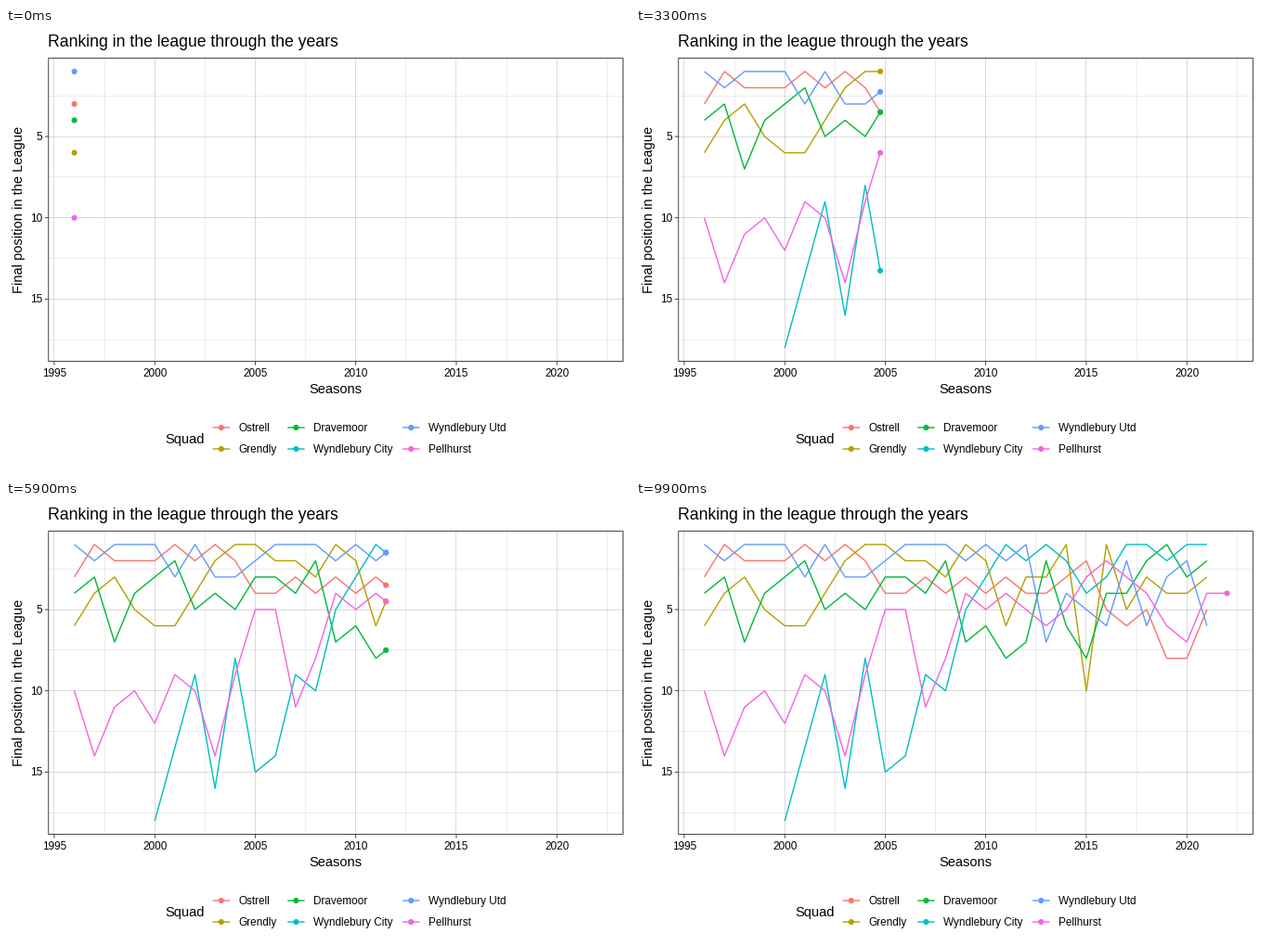
These frames come from a looping animation (672 by 480 pixels, 10000 ms). A matplotlib script:

```python
import math

import matplotlib.pyplot as plt
import numpy as np
from matplotlib.animation import FuncAnimation
from matplotlib.patches import Circle, Rectangle

W, H, DPI = 672, 480, 96
FRAMES, INTERVAL = 100, 100
PX = 72 / DPI                      # points per pixel
LEFT, RIGHT, TOP, BOTTOM = 45.45, 664.67, 32.0, 360.0
FIRST, LAST = 1996, 2022
LINE_W, DOT_R = 1.42, 3.08

# name, colour, first season, final positions
SQUADS = [
    ("Ostrell", "#F8766D", 1996,
     [3, 1, 2, 2, 2, 1, 2, 1, 2, 4, 4, 3, 4, 3, 4, 3, 4, 4, 3, 2, 5, 6, 5, 8, 8, 5]),
    ("Grendly", "#B79F00", 1996,
     [6, 4, 3, 5, 6, 6, 4, 2, 1, 1, 2, 2, 3, 1, 2, 6, 3, 3, 1, 10, 1, 5, 3, 4, 4, 3]),
    ("Dravemoor", "#00BA38", 1996,
     [4, 3, 7, 4, 3, 2, 5, 4, 5, 3, 3, 4, 2, 7, 6, 8, 7, 2, 6, 8, 4, 4, 2, 1, 3, 2]),
    ("Wyndlebury City", "#00BFC4", 2000,
     [18, 13.5, 9, 16, 8, 15, 14, 9, 10, 5, 3, 1, 2, 1, 2, 4, 3, 1, 1, 2, 1, 1]),
    ("Wyndlebury Utd", "#619CFF", 1996,
     [1, 2, 1, 1, 1, 3, 1, 3, 3, 2, 1, 1, 1, 2, 1, 2, 1, 7, 4, 5, 6, 2, 6, 3, 2, 6]),
    ("Pellhurst", "#F564E3", 1996,
     [10, 14, 11, 10, 12, 9, 10, 14, 9, 5, 5, 11, 8, 4, 5, 4, 5, 6, 5, 3, 2, 3, 4, 6, 7, 4, 4]),
]

plt.rcParams["font.family"] = "Liberation Sans"


def px_x(year):
    return LEFT + (np.asarray(year) - 1994.7) * (RIGHT - LEFT) / 28.6


def px_y(rank):
    return TOP + (np.asarray(rank) - 0.15) * (BOTTOM - TOP) / 18.7


fig = plt.figure(figsize=(W / DPI, H / DPI), dpi=DPI, facecolor="white")
ax = fig.add_axes([0, 0, 1, 1])
ax.set_xlim(0, W)
ax.set_ylim(H, 0)
ax.axis("off")


def stroke(xs, ys, color="black", width=1.0, alpha=1.0, z=1):
    line, = ax.plot(xs, ys, color=color, lw=width * PX, alpha=alpha, zorder=z,
                    solid_capstyle="butt", solid_joinstyle="round", snap=False)
    return line


def dot(x, y, color, z):
    return ax.add_patch(Circle((x, y), DOT_R, fc=color, ec="none", lw=0, zorder=z))


def label(x, y, text, size, ha="left", **kw):
    ax.text(x, y, text, fontsize=size, ha=ha, va="baseline", color="black", **kw)


def grid_x(year, alpha):
    x = math.floor(px_x(year)) + 0.5
    stroke([x, x], [TOP, BOTTOM], alpha=alpha)


def grid_y(rank, alpha):
    y = math.floor(px_y(rank)) + 0.5
    stroke([LEFT, RIGHT], [y, y], alpha=alpha)


def draw_axes():
    for year in np.arange(1997.5, 2023, 5):
        grid_x(year, 0.071)
    for rank in np.arange(2.5, 18, 5):
        grid_y(rank, 0.071)
    for year in range(1995, 2021, 5):
        x = px_x(year)
        grid_x(year, 0.142)
        stroke([x, x], [BOTTOM, BOTTOM + 3.67], width=0.71)
        label(x, 376, str(year), 8.8, "center")
    for rank in (5, 10, 15):
        y = px_y(rank)
        grid_y(rank, 0.142)
        stroke([LEFT - 3.67, LEFT], [y, y], width=0.71)
        label(38.85, round(float(y) + 4), str(rank), 8.8, "right")

    w = 0.71
    ax.add_patch(Rectangle((LEFT + w / 2, TOP + w / 2), RIGHT - LEFT - w, BOTTOM - TOP - w,
                           fill=False, ec="black", lw=w * PX, snap=False, zorder=20))
    label(LEFT, 20, "Ranking in the league through the years", 13.2)
    label((LEFT + RIGHT) / 2, 394, "Seasons", 11, "center")
    ax.text(18, (TOP + BOTTOM) / 2, "Final position in the League", fontsize=11,
            rotation=90, rotation_mode="anchor", ha="center", va="baseline")


def draw_legend():
    label(171, 448, "Squad", 11)
    for i, (name, color, _, _) in enumerate(SQUADS):
        x = (231.8, 312.4, 436.2)[i // 2]
        y = 431 + 23.04 * (i % 2)
        stroke([x - 9.2, x + 9.2], [y, y], color, LINE_W)
        dot(x, y, color, 2)
        label(x + 18.9, round(y + 4), name, 8.8)


draw_axes()
draw_legend()
trails = [stroke([], [], s[1], LINE_W, z=5) for s in SQUADS]
heads = [dot(0, 0, s[1], 10) for s in SQUADS]

# each season lands on a whole frame, with linear motion in between
SEASONS = np.arange(FIRST, LAST + 1)
KEYS = np.round((FRAMES - 1) * (SEASONS - FIRST) / (LAST - FIRST))


def update(i):
    now = np.interp(i, KEYS, SEASONS)
    for (_, _, start, ranks), trail, head in zip(SQUADS, trails, heads):
        years = start + np.arange(len(ranks))
        active = years[0] <= now <= years[-1]
        past = years < now
        xs, ys = years[past], np.array(ranks)[past]
        if active:
            rank = np.interp(now, years, ranks)
            xs, ys = np.append(xs, now), np.append(ys, rank)
            head.center = (float(px_x(now)), float(px_y(rank)))
        head.set_visible(bool(active))
        trail.set_data(px_x(xs), px_y(ys))
        trail.set_visible(len(xs) > 1)
    return trails + heads


anim = FuncAnimation(fig, update, frames=FRAMES, interval=INTERVAL,
                     init_func=lambda: update(0), repeat=True, repeat_delay=0, blit=False)
plt.show()
```
